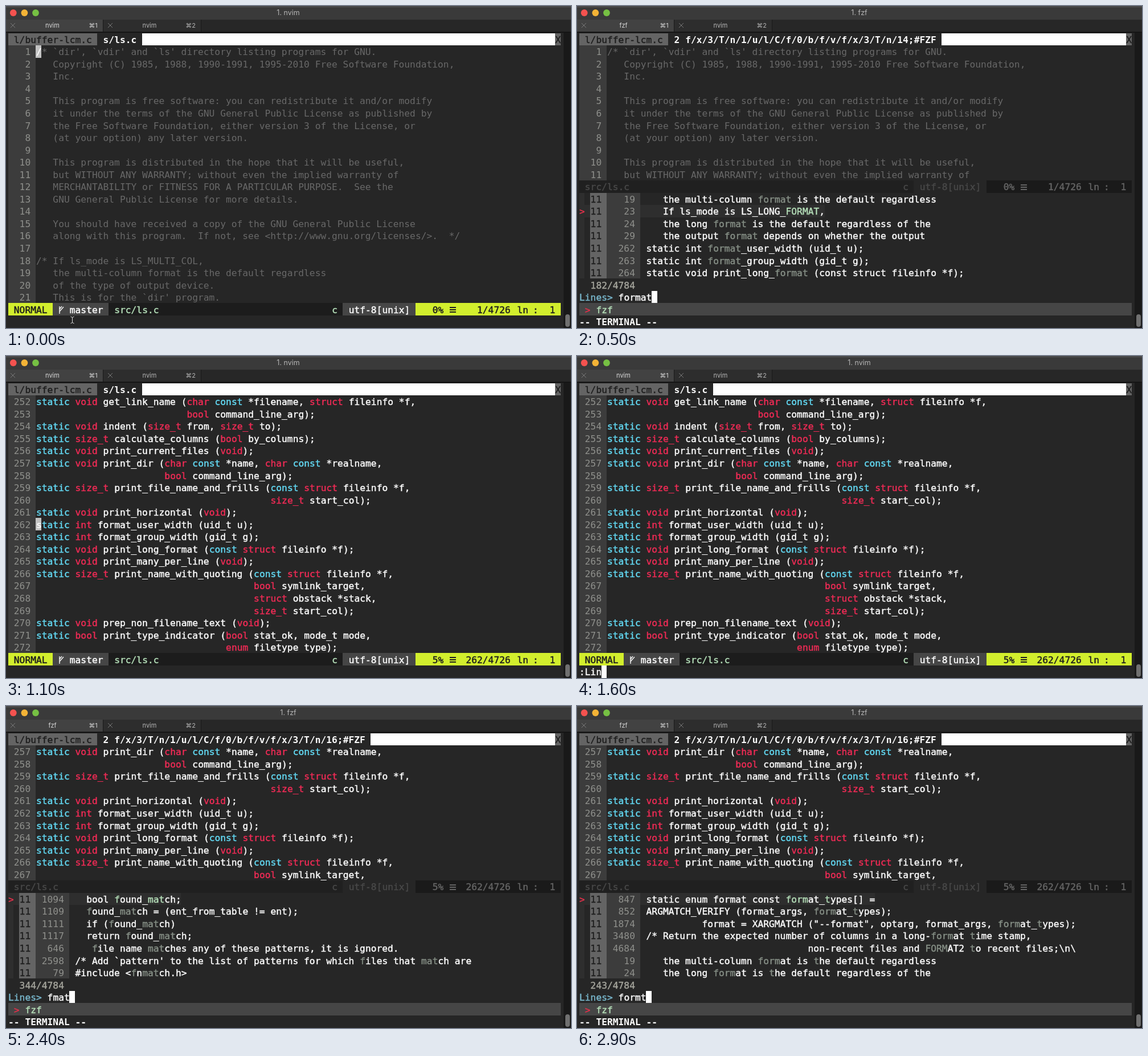
Recreate the animation shown at these times as an HTML page with a canvas. Size 992 by 565 pixels, loop 3 s.

```html
<!DOCTYPE html>
<html lang="en">
<head>
<meta charset="utf-8">
<title>Fuzzy line search</title>
<style>
html, body { margin: 0; width: 100%; height: 100%; overflow: hidden; background: #262626; }
canvas { display: block; }
</style>
</head>
<body>
<canvas id="stage" width="992" height="565"></canvas>
<script>
const ctx = document.getElementById('stage').getContext('2d');
const LEFT = 4, TOP = 48, CELL = 970 / 99, ROW = 21.545, COLS = 99;
const MONO = '16.27px "DejaVu Sans Mono", monospace';
const UI = 'Inter, "DejaVu Sans", sans-serif';
const C = {
  bg: '#262626', white: '#fcfcfc', comment: '#686868', keyword: '#62d8f2', type: '#ee2b55',
  number: '#8f908c', gutter: '#3c3c3c', strip: '#646464', dark: '#1e1e1e', bar: '#464646',
  lime: '#d2ee2d', mint: '#b4deb8', match: '#858e85', current: '#2e2e2e', prompt: '#78b7cc',
  pointer: '#e0304a', info: '#a4a49c', cursor: '#c2c2c2'
};

const LICENSE = `/* \`dir', \`vdir' and \`ls' directory listing programs for GNU.
   Copyright (C) 1985, 1988, 1990-1991, 1995-2010 Free Software Foundation,
   Inc.

   This program is free software: you can redistribute it and/or modify
   it under the terms of the GNU General Public License as published by
   the Free Software Foundation, either version 3 of the License, or
   (at your option) any later version.

   This program is distributed in the hope that it will be useful,
   but WITHOUT ANY WARRANTY; without even the implied warranty of
   MERCHANTABILITY or FITNESS FOR A PARTICULAR PURPOSE.  See the
   GNU General Public License for more details.

   You should have received a copy of the GNU General Public License
   along with this program.  If not, see <http://www.gnu.org/licenses/>.  */

/* If ls_mode is LS_MULTI_COL,
   the multi-column format is the default regardless
   of the type of output device.
   This is for the \`dir' program.`.split('\n');

const pad = (n, s) => ' '.repeat(n) + s;
const DECLS = [
  'static void get_link_name (char const *filename, struct fileinfo *f,',
  pad(27, 'bool command_line_arg);'),
  'static void indent (size_t from, size_t to);',
  'static size_t calculate_columns (bool by_columns);',
  'static void print_current_files (void);',
  'static void print_dir (char const *name, char const *realname,',
  pad(23, 'bool command_line_arg);'),
  'static size_t print_file_name_and_frills (const struct fileinfo *f,',
  pad(42, 'size_t start_col);'),
  'static void print_horizontal (void);',
  'static int format_user_width (uid_t u);',
  'static int format_group_width (gid_t g);',
  'static void print_long_format (const struct fileinfo *f);',
  'static void print_many_per_line (void);',
  'static size_t print_name_with_quoting (const struct fileinfo *f,',
  pad(39, 'bool symlink_target,'),
  pad(39, 'struct obstack *stack,'),
  pad(39, 'size_t start_col);'),
  'static void prep_non_filename_text (void);',
  'static bool print_type_indicator (bool stat_ok, mode_t mode,',
  pad(34, 'enum filetype type);')
];

const source = {};
LICENSE.forEach((s, i) => source[1 + i] = s);
DECLS.forEach((s, i) => source[252 + i] = s);
source[23] = '   If ls_mode is LS_LONG_FORMAT,';
source[24] = '   the long format is the default regardless of the';
source[29] = '   the output format depends on whether the output';

// Search results: braces enclose the matched characters.
const found = (query, lines) => lines.map(n => [n, query
  ? source[n].replace(new RegExp('(?<![a-z])' + query, 'i'), '{$&}')
  : source[n]]);
const matchRows = [
  [1094, '  bool {f}ound_{mat}ch;'],
  [1109, '  {f}ound_{mat}ch = (ent_from_table != ent);'],
  [1111, '  if ({f}ound_{mat}ch)'],
  [1117, '  return {f}ound_{mat}ch;'],
  [646, '   {f}ile name {mat}ches any of these patterns, it is ignored.'],
  [2598, "/* Add `pattern' to the list of patterns for which {f}iles that {mat}ch are"],
  [79, '#include <{f}n{mat}ch.h>']
];
const partly = part => matchRows.map(([n, s]) => [n, s.replace('{mat}', `{${part}}` + 'mat'.slice(part.length))]);
const formatLines = [19, 23, 24, 29, 262, 263, 264];
const results = {
  '': [4784, found('', [1, 2, 3, 4, 5, 6, 7])],
  f: [1684, found('f', [1, 2, 5, 7, 12, 13, 19])],
  fo: [1102, found('fo', [1, 2, 7, 13, 19, 23, 24])],
  for: [580, found('for', [1, 13, 19, 23, 24, 29, 262])],
  form: [247, found('form', formatLines)],
  format: [182, found('format', formatLines)],
  fm: [612, partly('m')],
  fma: [398, partly('ma')],
  fmat: [344, matchRows],
  formt: [243, [
    [847, 'static enum format const {form}at_{t}ypes[] ='],
    [852, 'ARGMATCH_VERIFY (format_args, {form}at_{t}ypes);'],
    [1874, pad(10, 'format = XARGMATCH ("--format", optarg, format_args, {form}at_{t}ypes);')],
    [3480, '/* Return the expected number of columns in a long-{form}at {t}ime stamp,'],
    [4684, pad(29, 'non-recent files and {FORM}AT2 {t}o recent files;\\n\\')],
    [19, '   the multi-column {form}at is {t}he default regardless'],
    [24, '   the long {form}at is {t}he default regardless of the']
  ]]
};

const x = col => LEFT + col * CELL;
const y = row => TOP + row * ROW;

function rect(color, left, top, w, h) {
  ctx.fillStyle = color;
  ctx.fillRect(left, top, w, h);
}
function fill(row, from, to, color, rows = 1) {
  const l = Math.floor(x(from)), t = Math.floor(y(row));
  rect(color, l, t, Math.floor(x(to)) - l, Math.floor(y(row + rows)) - t);
}
// A thin outline gives regular text a medium weight.
function put(row, col, text, color = C.white, bold = false) {
  const left = x(col), base = y(row) + 16.7;
  ctx.font = (bold ? 'bold ' : '') + MONO;
  ctx.textAlign = 'left';
  ctx.textBaseline = 'alphabetic';
  ctx.fillStyle = color;
  ctx.fillText(text, left, base);
  if (bold || color === C.comment || color === C.number) return;
  ctx.strokeStyle = color;
  ctx.lineWidth = 0.45;
  ctx.lineJoin = 'round';
  ctx.strokeText(text, left, base);
}
function label(text, cx, cy, size, color) {
  ctx.font = `${size}px ${UI}`;
  ctx.textAlign = 'center';
  ctx.textBaseline = 'middle';
  ctx.fillStyle = color;
  ctx.fillText(text, cx, cy);
}
function line(color, width, ...points) {
  ctx.strokeStyle = color;
  ctx.lineWidth = width;
  ctx.beginPath();
  points.forEach(([px, py]) => ctx.lineTo(px, py));
  ctx.stroke();
}

function closeMark(cx) {
  line('#787878', 1, [cx - 4, 30], [cx + 4, 38]);
  line('#787878', 1, [cx + 4, 30], [cx - 4, 38]);
}
function drawWindow(title) {
  rect(C.bg, 0, 0, 992, 565);
  rect('#3a3a3a', 0, 0, 992, 24);
  rect('#5c5c5c', 0, 1, 992, 1);
  ['#f4524f', '#f3b336', '#76c043'].forEach((color, i) => {
    ctx.fillStyle = color;
    ctx.beginPath();
    ctx.arc(12.8 + i * 19.6, 12, 5.9, 0, 7);
    ctx.fill();
  });
  label('1. ' + title, 495.5, 12.5, 12.5, '#b4b4b4');
  rect('#272727', 0, 24, 992, 21);
  rect('#424242', 0, 24, 170, 21);
  rect('#2d2d2d', 171, 24, 171, 21);
  rect('#191919', 170, 24, 1, 21);
  rect('#191919', 342, 24, 1, 21);
  rect('#151515', 0, 45, 992, 2);
  closeMark(12);
  closeMark(183);
  label(title, 81.5, 34.5, 11, '#d8d8d8');
  label('⌘1', 153, 34.5, 11, '#d8d8d8');
  label('nvim', 252, 34.5, 11, '#b4b4b4');
  label('⌘2', 324, 34.5, 11, '#b4b4b4');
  rect('#191919', 979, 47, 13, 518);
  ctx.fillStyle = '#707070';
  ctx.beginPath();
  ctx.roundRect(982, 541, 8, 22, 4);
  ctx.fill();
}

function drawTabline(name) {
  const end = 18 + name.length;
  fill(0, 0, 16, C.strip);
  put(0, 1, 'l/buffer-lcm.c', C.dark);
  put(0, 17, name, C.white, true);
  fill(0, end, 98, '#fff');
  fill(0, 98, COLS, C.strip);
  put(0, 98, 'X', C.dark);
}

function drawSource(first, rows) {
  fill(1, 0, 5, C.gutter, rows);
  for (let i = 0; i < rows; i++) {
    const n = first + i, text = source[n];
    put(1 + i, 1, String(n).padStart(3), C.number);
    if (n < 252) {
      put(1 + i, 5, text, C.comment);
      continue;
    }
    for (const m of text.matchAll(/\w+|[^\w\s]+/g)) {
      const color = /^(static|const)$/.test(m[0]) ? C.keyword
        : /^(void|char|bool|int|size_t|struct|enum)$/.test(m[0]) ? C.type : C.white;
      put(1 + i, 5 + m.index, m[0], color);
    }
  }
}

function drawPosition(row, at, color) {
  put(row, 75, at > 1 ? ' 5%' : ' 0%', color);
  for (let i = 0; i < 3; i++) rect(color, x(79) + 1, Math.round(y(row)) + 6 + i * 4, 11, 2);
  put(row, 82, `${at}/4726`.padStart(8), color);
  put(row, 91.2, 'ln', color);
  put(row, 94, ':', color);
  put(row, 97, '1', color);
}

function drawEditor({ at, command, mouse }) {
  drawTabline('s/ls.c');
  const first = at > 1 ? at - 10 : 1, row = 1 + at - first;
  drawSource(first, 21);
  if (!command) {
    fill(row, 5, 6, C.cursor);
    put(row, 5, source[at][0], '#fff');
  }
  fill(22, 0, COLS, '#1c1c1c');
  fill(22, 0, 8, C.lime);
  put(22, 1, 'NORMAL', C.dark);
  fill(22, 8, 18, C.bar);
  line(C.white, 1.4, [94, 540], [94, 527]);
  line(C.white, 1.4, [94, 532], [98, 527]);
  line(C.white, 1.4, [94, 536], [101, 528]);
  put(22, 11, 'master');
  put(22, 19, 'src/ls.c', C.mint);
  put(22, 58, 'c', C.mint);
  fill(22, 60, 73, C.bar);
  put(22, 61, 'utf-8[unix]');
  fill(22, 73, COLS, C.lime);
  drawPosition(22, at, C.dark);
  if (command) {
    put(23, 0, command);
    fill(23, command.length, command.length + 1, '#fff');
  }
  if (mouse) {
    line('#d8d8d8', 1, [116.5, 546], [116.5, 556]);
    line('#d8d8d8', 1, [113.5, 545], [116.5, 546.5], [119.5, 545]);
    line('#d8d8d8', 1, [113.5, 557], [116.5, 555.5], [119.5, 557]);
  }
}

function drawResult(row, [n, marked], isCurrent) {
  const plain = marked.replace(/[{}]/g, '');
  if (isCurrent) {
    fill(row, 1, 12 + plain.length, C.current);
    put(row, 0, '>', C.pointer, true);
  }
  fill(row, 2, 5, C.strip);
  fill(row, 5, 11, C.gutter);
  put(row, 2, '11', C.dark);
  put(row, 6, String(n).padStart(4), C.number);
  let col = 12;
  marked.split(/[{}]/).forEach((part, i) => {
    put(row, col, part, i % 2 ? (isCurrent ? C.mint : C.match) : C.white);
    col += part.length;
  });
}

function drawSearch({ at, query, pick = 0 }) {
  drawTabline(`2 f/x/3/T/n/1/u/l/C/f/0/b/f/v/f/x/3/T/n/${at > 1 ? 16 : 14};#FZF`);
  drawSource(at > 1 ? at - 5 : 1, 11);
  fill(12, 0, 60, '#202020');
  fill(12, 60, 73, '#262626');
  fill(12, 73, COLS, '#1a1a1a');
  put(12, 1, 'src/ls.c', '#484848');
  put(12, 58, 'c', '#484848');
  put(12, 61, 'utf-8[unix]', '#484848');
  drawPosition(12, at, '#646464');

  const [count, rows] = results[query];
  fill(13, 0, 1, C.current, 7);
  rows.forEach((entry, i) => drawResult(13 + i, entry, i === pick));
  put(20, 2, `${count}/4784`, C.info);
  put(21, 0, 'Lines>', C.prompt);
  put(21, 7, query);
  fill(21, 7 + query.length, 8 + query.length, '#fff');
  fill(22, 0, COLS, C.bar);
  put(22, 1, '>', C.pointer, true);
  put(22, 3, 'fzf', C.mint);
  put(23, 0, '-- TERMINAL --', C.white, true);
}

const edit = (at, more) => ({ at, title: 'nvim', ...more });
const search = (at, query, more) => ({ at, query, title: 'fzf', ...more });
const STEP = 100;
const timeline = [
  edit(1, { mouse: true }),
  edit(1, { command: ':Lines' }),
  search(1, '', { title: 'nvim' }),
  search(1, 'for'),
  ...[0, 1, 2, 3, 4].map(pick => search(1, 'format', { pick })),
  edit(262, { title: 'fzf' }),
  ...Array(3).fill(edit(262)),
  ...[':', ':L', ':Li', ':Lin', ':Lines'].map(command => edit(262, { command })),
  search(262, '', { title: 'nvim' }),
  ...['', 'f', 'fm', 'fma', 'fmat', 'fmat', 'fm', 'f', 'fo', 'form', 'formt'].map(q => search(262, q))
];

let shown = -1;
function tick() {
  const step = Math.floor(performance.now() / STEP) % timeline.length;
  if (step !== shown) {
    const scene = timeline[step];
    drawWindow(scene.title);
    (scene.query === undefined ? drawEditor : drawSearch)(scene);
    shown = step;
  }
  requestAnimationFrame(tick);
}
tick();
</script>
</body>
</html>
```
